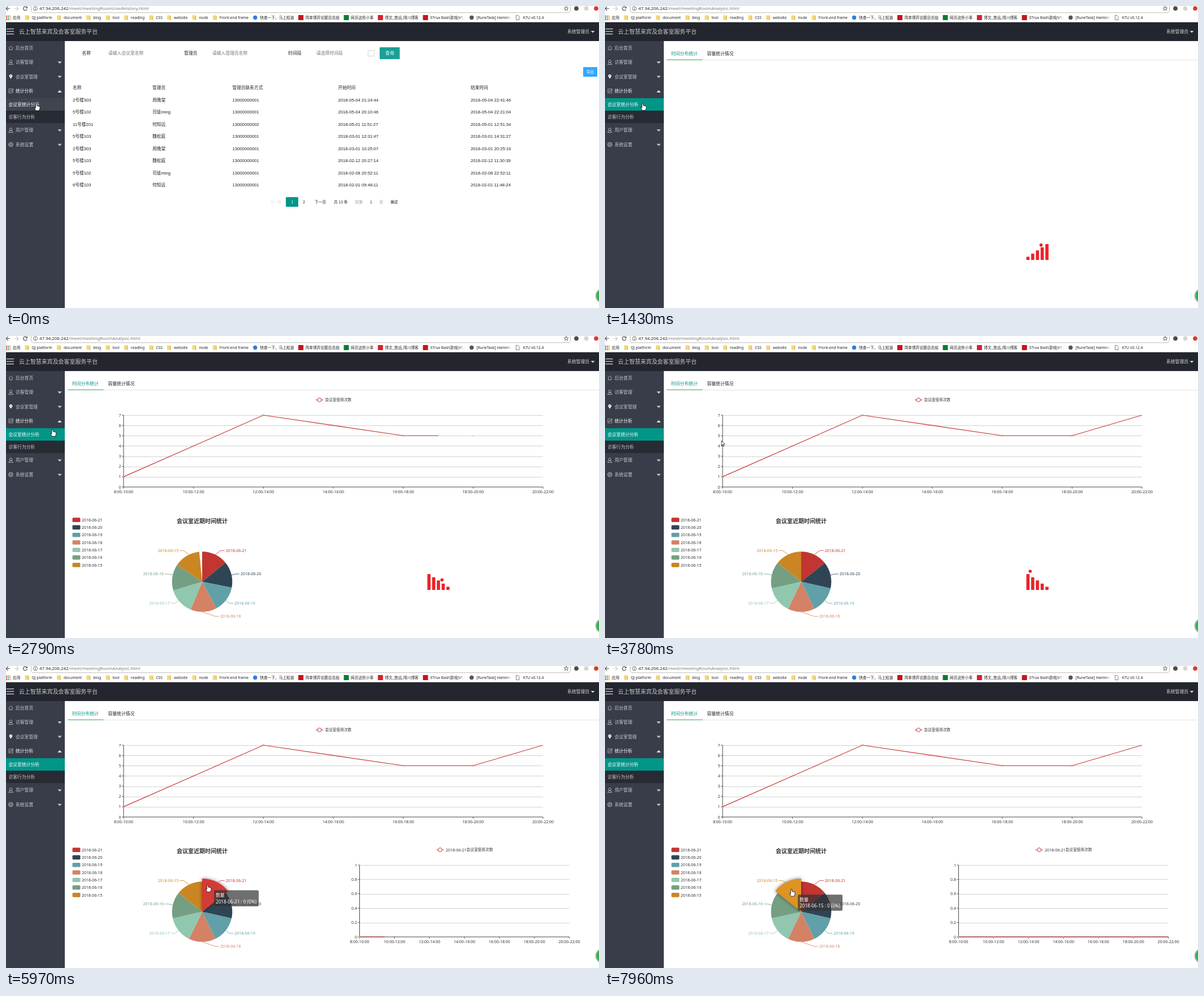
Recreate the animation shown at these times as an HTML page with a canvas. Size 1049 by 534 pixels, loop 8000 ms.

```html
<!DOCTYPE html>
<html lang="zh">
<head>
<meta charset="utf-8">
<title>会议室统计分析</title>
<style>
html, body { margin: 0; width: 100%; height: 100%; overflow: hidden; background: #fff; }
canvas { display: block; }
</style>
</head>
<body>
<canvas id="stage" width="1049" height="534"></canvas>
<script>
const ctx = document.getElementById('stage').getContext('2d');
const LOOP = 8000;
const LATIN = '"Noto Sans", "Noto Sans CJK SC", "Noto Sans CJK", sans-serif';
const PAGE = '"Liberation Sans", "Noto Sans CJK SC", "Noto Sans CJK", sans-serif';
const GREEN = '#009688', RED = '#c23531', INK = '#222', PALE = '#c6c7cb', GREY = '#555';
const PALETTE = [RED, '#2f4554', '#61a0a8', '#d48265', '#91c7ae', '#749f83', '#ca8622'];
const DATES = PALETTE.map((_, i) => '2018-06-' + (21 - i));
const HOURS = PALETTE.map((_, i) => `${8 + 2 * i}:00-${10 + 2 * i}:00`);

// Moments of the story, in ms.
const LEAVE = 280, LOADED = 450, FRAMED = 720, CHARTS = 2040, HOVER = 4970, FREEZE = 5360, DETAIL = 5970;

// Pointer stops: time, x, y.
const STOPS = [[0, 53.5, 172.5], [1300, 53.5, 172.5], [1430, 66.5, 172], [2790, 82, 165],
  [3600, 172, 140], [4580, 356.5, 384], [5970, 356.5, 387], [6900, 356.5, 387], [7560, 331, 391], [LOOP, 329.5, 395]];

const clamp = v => Math.max(0, Math.min(1, v));
const easeOut = (v, power = 2.2) => 1 - (1 - clamp(v)) ** power;

function pointerAt(t) {
  const i = STOPS.findIndex(s => s[0] > t);
  const [t0, x0, y0] = STOPS[i - 1], [t1, x1, y1] = STOPS[i], f = (t - t0) / (t1 - t0);
  return [x0 + (x1 - x0) * f, y0 + (y1 - y0) * f];
}

// Draws text centred on y and returns its width.
function text(s, x, y, size = 7.8, color = INK, align = 'left', font = PAGE, weight = 400) {
  ctx.font = `${weight} ${size}px ${font}`;
  ctx.fillStyle = color;
  ctx.textAlign = align;
  ctx.fillText(s, x, y + size * 0.36);
  return ctx.measureText(s).width;
}
const label = (s, x, y, align = 'left', color = '#333', size = 7) => text(s, x, y, size, color, align, LATIN);

function path(points, close) {
  ctx.beginPath();
  points.forEach(([x, y]) => ctx.lineTo(x, y));
  if (close) ctx.closePath();
}

function line(points, color, width = 1, close = false) {
  path(points, close);
  ctx.strokeStyle = color;
  ctx.lineWidth = width;
  ctx.stroke();
}

function poly(points, color) {
  path(points, true);
  ctx.fillStyle = color;
  ctx.fill();
}

function rect(x, y, w, h, color, r = 0) {
  ctx.fillStyle = color;
  ctx.beginPath();
  ctx.roundRect(x, y, w, h, r);
  ctx.fill();
}

function circle(x, y, r, fill, stroke, width = 0.8) {
  ctx.beginPath();
  ctx.arc(x, y, r, 0, 7);
  if (fill) { ctx.fillStyle = fill; ctx.fill(); }
  if (stroke) { ctx.strokeStyle = stroke; ctx.lineWidth = width; ctx.stroke(); }
}

const hline = (x0, x1, y, color, width) => line([[x0, y], [x1, y]], color, width);
const caret = (x, y, r, h, color) => poly([[x - r, y - h / 2], [x + r, y - h / 2], [x, y + h / 2]], color);

function navArrow(x, dir, color) {
  hline(x - 3.5, x + 3.5, 4.5, color, 1.1);
  line([[x, 1], [x + 3.5 * dir, 4.5], [x, 8]], color, 1.1);
}

function reloadIcon(loading) {
  if (loading) {
    line([[31, 1], [38, 8]], GREY, 1.2);
    line([[38, 1], [31, 8]], GREY, 1.2);
    return;
  }
  ctx.beginPath();
  ctx.arc(34, 4.5, 3.3, 0.3, 5.4);
  ctx.strokeStyle = GREY;
  ctx.lineWidth = 1.2;
  ctx.stroke();
  poly([[38, 0.5], [38, 4], [34.5, 4]], GREY);
}

const star = (x, y) => line(Array.from({ length: 10 }, (_, i) => {
  const a = i * Math.PI / 5, r = i % 2 ? 1.7 : 4;
  return [x + r * Math.sin(a), y - r * Math.cos(a)];
}), GREY, 0.9, true);

const folder = x => {
  rect(x, 16.5, 7, 8, '#f5d77e', 0.8);
  rect(x + 5, 18, 2, 6.5, '#e8c35c', 0.5);
};
const square = color => x => rect(x - 0.5, 16, 9, 9, color);
const dot = color => x => circle(x + 3.5, 20.5, 3.7, color);
const sheet = x => line([[x, 16.5], [x + 3.5, 16.5], [x + 5.5, 18.5], [x + 5.5, 24.5], [x, 24.5]], '#666', 0.8, true);
const apps = x => {
  for (let i = 0; i < 9; i++)
    rect(x + i % 3 * 3, 17 + Math.floor(i / 3) * 3, 2, 2, ['#d9463a', '#4a9c50', '#d9a03a'][i % 3]);
};

const BOOKMARKS = [[apps, '应用'],
  ...['QJ platform', 'document', 'blog', 'tool', 'reading', 'CSS', 'website', 'node', 'Front-end frame'].map(s => [folder, s]),
  [dot('#2f7de0'), '快查一下，马上知道'], [square('#c9121a'), '简单博弈论题目总结'],
  [square('#0a7d2c'), '网页这些小事'], [square('#d8202a'), '博文_悠远_晴川博客'],
  [square('#c9121a'), '37rux Bash游戏(V1.0'], [dot(GREY), '[RuneTask] Hamming'], [sheet, 'K7U v0.12.4']];

function bookmarks() {
  const limit = 62;
  let x = 0;
  BOOKMARKS.forEach(([icon, s]) => {
    icon(x);
    const w = label(s, x + 12, 20.5, 'left', INK, 6.7), end = x + 12 + limit;
    if (w > limit - 1) {
      const fade = ctx.createLinearGradient(end - 9, 0, end, 0);
      fade.addColorStop(0, 'rgba(255,255,255,0)');
      fade.addColorStop(1, '#fff');
      rect(end - 9, 14, 30, 13, fade);
    }
    x += 20.2 + Math.min(w, limit);
  });
}

function browser(url, loading) {
  line([[44.5, -1], [44.5, 9], [47, 11.8], [996, 11.8], [998.5, 9], [998.5, -1]], '#b5b5b5', 0.9);
  hline(0, 1049, 28.5, '#b8b8b8');
  navArrow(3.5, -1, GREY);
  navArrow(18.5, 1, '#ccc');
  reloadIcon(loading);
  circle(52, 4.5, 3.5, null, GREY);
  rect(51.5, 4, 1, 2.8, GREY);
  rect(51.5, 2.2, 1, 1, GREY);
  const w = label('47.94.206.242', 59, 4.5, 'left', INK, 7.9);
  label(url, 59 + w, 4.5, 'left', '#777', 7.9);
  star(991, 4.5);
  ['#54483f', '#d5d5d5', '#d93a32'].forEach((c, i) => circle(1009 + 17.5 * i, 4.3, 3.9, c));
  bookmarks();
}

const ICONS = {
  home(y) {
    line([[5, y], [8.5, y - 3.5], [12, y]], PALE, 0.8);
    line([[6, y], [6, y + 3.5], [11, y + 3.5], [11, y]], PALE, 0.8);
  },
  user(y) {
    circle(8.5, y - 1.7, 2.2, null, PALE);
    line([[4.8, y + 4], [6.5, y + 1], [10.5, y + 1], [12.3, y + 4]], PALE, 0.8, true);
  },
  pin(y) {
    poly([[6, y - 0.5], [11, y - 0.5], [8.5, y + 4]], '#fff');
    circle(8.5, y - 1.2, 2.7, '#fff');
    circle(8.5, y - 1.2, 0.9, '#393d49');
  },
  chart(y) {
    line([[5, y - 3.5], [12, y - 3.5], [12, y + 3.5], [5, y + 3.5]], PALE, 0.7, true);
    line([[6, y + 2], [8, y - 1], [9.5, y + 1], [12.5, y - 4]], PALE, 0.8);
  },
  gear(y) {
    circle(8.5, y, 3.7, null, PALE, 1);
    circle(8.5, y, 1.6, null, PALE);
  }
};
const MENU = [['home', '后台首页'], ['user', '访客管理'], ['pin', '会议室管理'], ['chart', '统计分析'],
  ['user', '用户管理'], ['gear', '系统设置']];

function chrome(active) {
  rect(0, 29, 1049, 33, '#23262e');
  for (let i = 0; i < 3; i++) hline(1, 14, 40.5 + 4.5 * i, '#d5d6d8', 1.3);
  text('云上智慧来宾及会客室服务平台', 23, 45, 9.95, PALE);
  text('系统管理员', 993, 45, 7.8, '#d5d6d8');
  caret(1038, 45.7, 3.5, 3.6, '#d5d6d8');
  rect(0, 62, 104, 472, '#393d49');
  rect(0, 163, 104, 22, active ? GREEN : '#40444e');
  rect(0, 185, 104, 22, '#282b33');
  MENU.forEach(([icon, s], i) => {
    const open = i === 3, color = open ? '#fff' : PALE;
    const y = 74 + 25.4 * i + (i > 3 ? 44 : 0);
    ICONS[icon](y);
    text(s, 17, y, 7.8, color, 'left', PAGE, open ? 500 : 400);
    if (i) caret(95, y + 0.6, 3.7, open ? -3.8 : 3.8, color);
  });
  text('会议室统计分析', 4.5, 174, 7.8, '#fff', 'left', PAGE, 500);
  text('访客行为分析', 4.5, 196, 7.8, PALE);
}

// Lays out words one after the other.
function row(x, y, gap, words) {
  words.forEach(([s, color]) => { x += text(s, x, y, 6.7, color) + gap; });
}

function button(s, x, y, w, h, color, size) {
  rect(x, y, w, h, color, 1);
  text(s, x + w / 2, y + h / 2, size, '#fff', 'center');
}

const TEL = '13000000001', TEL2 = '13000000002';
const BOOKINGS = [['名称', '管理员', '管理员联系方式', '开始时间', '结束时间'],
  ['2号楼303', '周晚棠', TEL, '2018-05-04 21:24:44', '2018-05-04 22:41:46'],
  ['5号楼102', '司徒ming', TEL, '2018-05-04 20:10:46', '2018-05-04 22:21:04'],
  ['11号楼201', '何知远', TEL2, '2018-05-01 11:51:27', '2018-05-01 12:51:34'],
  ['5号楼103', '魏松庭', TEL, '2018-03-01 12:31:47', '2018-03-01 14:31:27'],
  ['2号楼303', '周晚棠', TEL, '2018-03-01 10:25:07', '2018-03-01 20:25:16'],
  ['5号楼103', '魏松庭', TEL, '2018-02-12 20:27:14', '2018-02-12 11:30:39'],
  ['5号楼102', '司徒ming', TEL, '2018-02-08 20:52:11', '2018-02-08 22:52:11'],
  ['6号楼103', '何知远', TEL, '2018-02-01 09:48:11', '2018-02-01 11:48:24']];
const COLUMNS = [118, 259, 400.5, 587.5, 822];

function historyPage() {
  [['名称', '请输入会议室名称'], ['管理员', '请输入管理员名称'], ['时间段', '请选择时间段']].forEach(([s, hint], i) => {
    const x = 181 + 184 * i;
    text(s, x - 31 + (i ? 4.5 : 0), 83.5, 7.8, INK, 'right');
    text(hint, x, 83.5, 7.8, '#777');
  });
  ctx.setLineDash([1, 1]);
  ctx.strokeStyle = '#999';
  ctx.lineWidth = 0.8;
  ctx.strokeRect(640.5, 78.5, 11, 10);
  ctx.setLineDash([]);
  button('查询', 661, 73, 35.5, 21, '#1aa094', 7.8);
  button('导出', 1021, 108, 25, 17, '#34a8ff', 6.7);
  BOOKINGS.forEach((cells, r) => cells.forEach((s, c) => text(s, COLUMNS[c], 144.3 + 21.55 * r, 7.7)));
  rect(495, 338, 22, 17, GREEN, 1);
  row(467.5, 347, 17, [['上一页', '#d2d2d2'], ['1', '#fff'], ['2'], ['下一页']]);
  row(580, 347, 13, [['共 13 条'], ['到第', '#999'], ['1'], ['页', '#999'], ['确定']]);
}

function tabs() {
  hline(109, 1049, 95.5, '#e2e2e2');
  rect(109, 94.5, 63.5, 1.3, '#5fb878');
  text('时间分布统计', 117, 84, 7.8, GREEN);
  text('容量统计情况', 180.5, 84);
}

// A ball climbs five bars, which then flip so that it can climb back.
function loader(t) {
  const K = 0.56, X = 745.4, Y = 449, color = '#ec2227';
  const p = (t - 320) / 400 % 10;
  const flip = easeOut(p - 4) - easeOut(p - 9);
  for (let i = 0; i < 5; i++) {
    const h = 10 * (i + 1) + flip * (40 - 20 * i);
    rect(X + 15 * i * K, Y - h * K, 10 * K, h * K, color);
  }
  const step = Math.floor(p % 5), f = p % 1;
  let x = 60, y = 40 * (1 - easeOut(f));
  if (step < 4) {
    const rise = easeOut(f / 0.7), fall = easeOut((f - 0.7) / 0.3);
    x = 15 * step + 8 * rise + 7 * fall;
    y = 10 * step + 14 * rise - 4 * fall;
  }
  if (p >= 5) x = 60 - x;
  circle(X + (x + 5) * K, Y - (y + 15) * K, 5 * K, color);
}

function legend(x, y, date) {
  hline(x - 6.7, x + 6.7, y, RED);
  circle(x, y, 3.4, '#fff', RED, 1);
  const w = date ? label(date, x + 10, y) : 0;
  label('会议室使用次数', x + 10 + w, y, 'left', '#333', 6.7);
}

// Line chart whose line is revealed from the left.
function lineChart(x0, x1, top, bottom, unit, max, values, progress) {
  const dx = (x1 - x0) / 6, height = bottom - top;
  for (let v = 0; v < max + unit / 2; v += unit) {
    const y = bottom - v / max * height;
    if (v) hline(x0, x1, Math.round(y) + 0.5, '#ccc', 0.9);
    hline(x0 - 3, x0, y, '#333', 0.8);
    label(String(+v.toFixed(1)), x0 - 4.5, y, 'right');
  }
  line([[x0, top], [x0, bottom], [x1, bottom]], '#333', 0.9);
  HOURS.forEach((s, i) => {
    const x = x0 + i * dx;
    line([[x, bottom], [x, bottom + 3]], '#333', 0.8);
    label(s, x, bottom + 8, 'center');
  });
  const points = values.map((v, i) => [x0 + i * dx, bottom - v / max * height]);
  const edge = x0 + (x1 - x0) * progress;
  ctx.save();
  ctx.beginPath();
  ctx.rect(x0 - 2, top - 4, edge - x0 + 2, height + 8);
  ctx.clip();
  line(points, RED, 1.15);
  ctx.restore();
  points.slice(0, 6).forEach(([x, y]) => {
    const r = clamp((edge + dx * 0.6 - x) / (dx * 0.4));
    if (r) circle(x, y, 1.2 * r, '#fff', RED, 0.7);
  });
}

function pie(progress, hover) {
  const cx = 347, cy = 434.5, R = 53.3, step = Math.PI * 2 / 7;
  const slice = (i, r, color) => {
    const from = i * step * progress - Math.PI / 2;
    ctx.beginPath();
    ctx.moveTo(cx, cy);
    ctx.arc(cx, cy, r, from, from + step * progress);
    ctx.fillStyle = color;
    ctx.fill();
  };
  DATES.forEach((s, i) => {
    const a = (i + 0.5) * step, sin = Math.sin(a), cos = Math.cos(a), side = i < 4 ? 1 : -1;
    const x = cx + side * (32 + 37.5 * Math.abs(sin) ** 1.6), y = cy - 61.2 * cos;
    line([[cx + R * sin, cy - R * cos], [x - 9 * side, y], [x - 2 * side, y]], PALETTE[i], 0.8);
    label(s, x, y, side > 0 ? 'left' : 'right', PALETTE[i]);
    rect(117.5, 321.3 + 13.3 * i, 14, 7.6, PALETTE[i], 1.6);
    label(s, 134, 325.3 + 13.3 * i);
    slice(i, R, PALETTE[i]);
  });
  if (hover >= 0) {
    ctx.save();
    ctx.shadowColor = 'rgba(0,0,0,.5)';
    ctx.shadowBlur = 6;
    slice(hover, R + 5.3, hover ? '#de9325' : '#d53a36');
    ctx.restore();
  }
  text('会议室近期时间统计', cx, 327, 10, '#333', 'center', PAGE, 700);
}

function tooltip(x, y, date) {
  rect(x, y, 79, 28.5, 'rgba(50,50,50,.7)', 2.2);
  label('数量', x + 3, y + 8.7, 'left', '#fff', 7.8);
  label(date + ' : 0 (0%)', x + 3, y + 20.2, 'left', '#fff', 8.15);
}

const HAND = [[-1, 0], [1, 0], [1.3, 4], [6.5, 5.3], [6.5, 8.5], [5, 12.5], [-0.5, 12.5], [-3.6, 7.5], [-1.2, 8]];
const ARROW = [[0, 0], [0, 8.6], [2, 6.9], [3.5, 10], [4.9, 9.4], [3.5, 6.4], [6, 6.2]];

function pointer(x, y, shape) {
  const points = shape.map(([a, b]) => [x + a, y + b]);
  poly(points, '#fff');
  line(points, '#111', 0.8, true);
}

function draw(t) {
  const [px, py] = pointerAt(t);
  const history = t < LEAVE, framed = history || t >= FRAMED;
  const hover = t < HOVER ? -1 : px > 347 ? 0 : 6;
  ctx.fillStyle = '#fff';
  ctx.fillRect(0, 0, 1049, 534);
  browser(`/meet/meetingRoom${history ? 'UsedHistory' : 'Analysic'}.html`, !framed);
  if (framed) chrome(!history);
  if (history) historyPage();
  if (t >= LOADED) tabs();
  if (t >= LOADED && t < DETAIL) loader(Math.min(t, FREEZE));
  if (t >= CHARTS) {
    const grown = clamp((t - CHARTS) / 1000);
    legend(554.5, 113);
    lineChart(208, 950, 140, 267, 1, 7, [1, 4, 7, 6, 5, 5, 7], grown);
    pie(easeOut(grown, 3), hover);
  }
  if (t >= DETAIL) {
    legend(768, 325, DATES[0]);
    lineChart(625.5, 996.5, 352, 479, 0.2, 1, Array(7).fill(0), clamp((t - DETAIL) / 1000 + 0.118));
  }
  circle(1056, 512.5, 12.5, '#2fb344', '#b5b8b5', 2);
  if (hover >= 0) tooltip(px + 11.5, py + 9.5, DATES[hover]);
  const link = px < 104 || Math.hypot(px - 347, py - 434.5) < 53;
  pointer(px, py, framed && link ? HAND : ARROW);
}

const start = performance.now();
function frame() {
  draw((performance.now() - start) % LOOP);
  requestAnimationFrame(frame);
}
frame();
</script>
</body>
</html>
```
